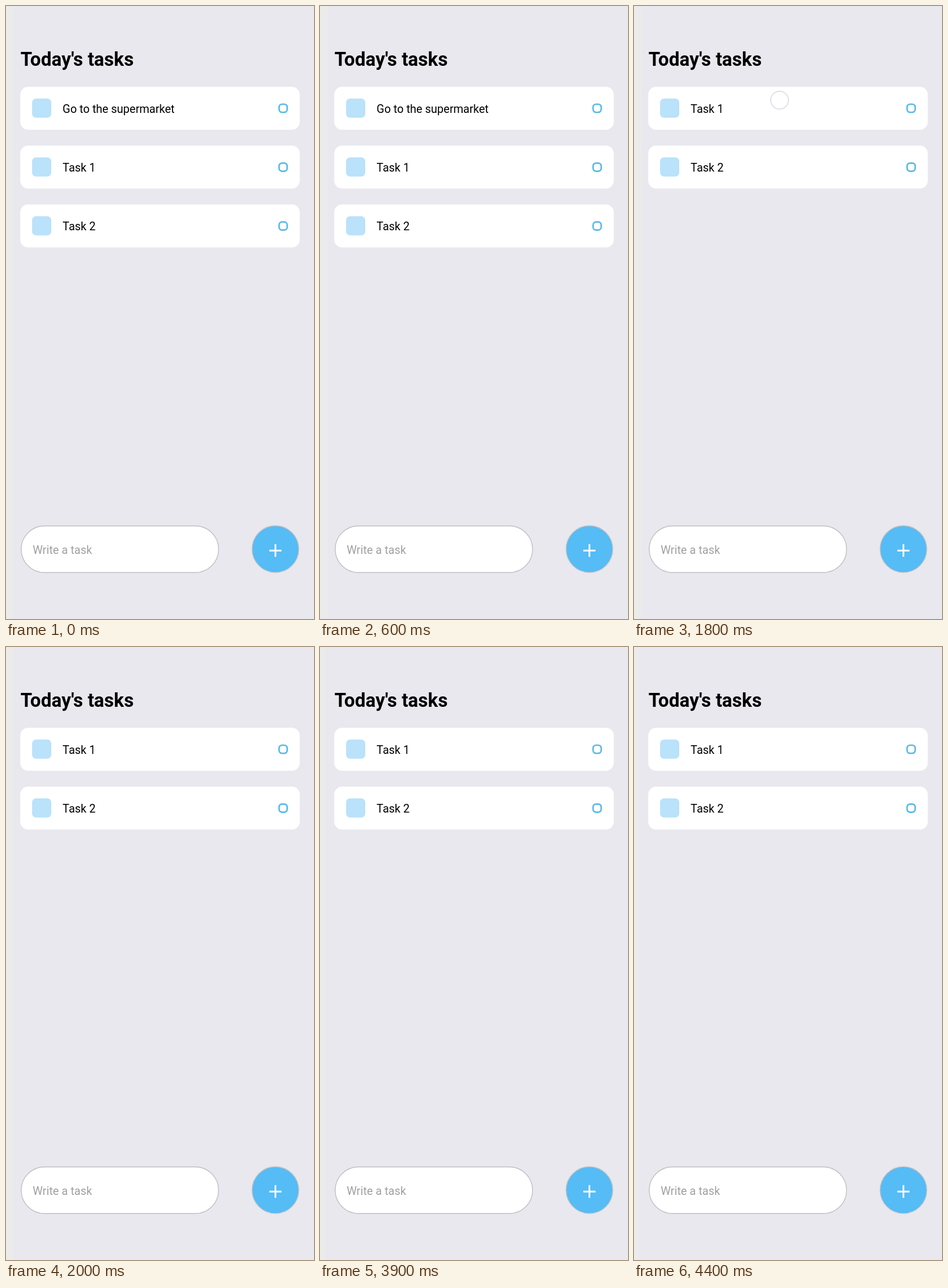
An HTML page that plays this animation: 531x1055 px, repeating every 4700 ms.

```html
<!DOCTYPE html>
<html lang="en">
<head>
<meta charset="utf-8">
<title>Today's tasks</title>
<style>
  html, body { margin: 0; width: 100%; height: 100%; overflow: hidden; background: #e8e8ee; }
  svg { display: block; width: 100%; height: 100%; }
  text { font: 19.5px Roboto, sans-serif; }
  .title { font-weight: 700; font-size: 32.5px; }
  .hint { fill: #a0a0a2; }
  .edge { fill: #ebebeb; animation: edge 4.7s step-end infinite; }
  .done { animation: done 4.7s step-end infinite; }
  .rest { animation: rest 4.7s step-end infinite; }
  .touch { opacity: 0; animation: touch 4.7s step-end infinite; }

  @keyframes edge {
    0% { transform: none; }
    44.68% { transform: translateX(-3px); }
  }
  @keyframes done {
    0% { opacity: 1; }
    34.04% { opacity: .2; }
    38.297% { opacity: 0; }
  }
  @keyframes rest {
    0% { transform: none; }
    38.297% { transform: translateY(-101.3px); }
  }
  @keyframes touch {
    0% { opacity: 0; }
    34.04% { opacity: 1; }
    38.297% { opacity: .6; }
    40.425% { opacity: 0; }
  }
</style>
</head>
<body>
<svg viewBox="0 0 531 1055" preserveAspectRatio="none">
  <defs>
    <g id="card">
      <rect x="24.5" y="139" width="482" height="74" rx="13.7" fill="#fff"/>
      <rect x="45" y="159.2" width="33" height="33" rx="6.8" fill="#bae2fa"/>
      <rect x="470.8" y="169" width="14" height="14" rx="5.2" fill="none" stroke="#5ab9e8" stroke-width="2.7"/>
    </g>
  </defs>

  <rect width="531" height="1055" fill="#e8e8ee"/>
  <rect class="edge" x="-3" width="16" height="1055"/>
  <text class="title" x="25" y="103">Today's tasks</text>

  <g class="done">
    <use href="#card"/>
    <text x="97.6" y="183.7">Go to the supermarket</text>
  </g>
  <g class="rest">
    <use href="#card" y="101.3"/>
    <text x="97.6" y="285">Task 1</text>
    <use href="#card" y="202.6"/>
    <text x="97.6" y="386.3">Task 2</text>
  </g>

  <g stroke="#c0c0c2" stroke-width="1.4">
    <rect x="26.2" y="894.7" width="340.3" height="80.3" rx="40.1" fill="#fff"/>
    <circle cx="464.5" cy="934.7" r="40.2" fill="#55bcf6"/>
  </g>
  <text class="hint" x="46" y="942.6">Write a task</text>
  <path d="M454 937.2h21M464.5 926.3v21.8" stroke="#fff" stroke-width="3"/>

  <circle class="touch" cx="251" cy="162" r="15.3" fill="#fff" fill-opacity=".75" stroke="#cbcbdc" stroke-width="1.9"/>
</svg>
</body>
</html>
```
